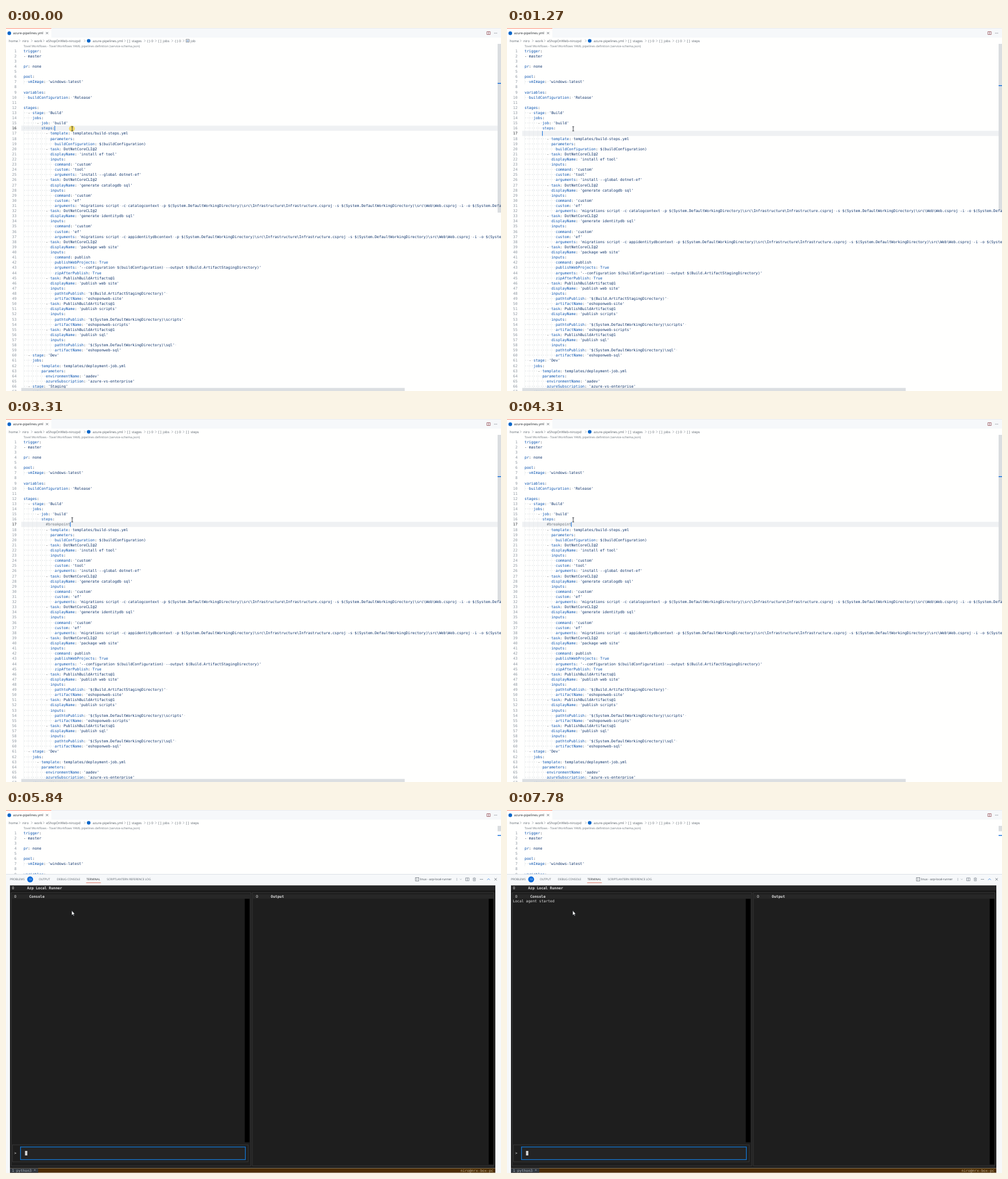
An HTML page that plays this animation: 874x641 px, repeating every 8000 ms.

```html
<!DOCTYPE html>
<html lang="en">
<head>
<meta charset="utf-8">
<title>Pipeline editor</title>
<style>
  html, body { margin: 0; width: 100%; height: 100%; overflow: hidden; background: #fffffe; }
  svg { display: block; width: 874px; height: 641px; }
  text { white-space: pre; text-rendering: geometricPrecision; }
  .mono { font-family: "DejaVu Sans Mono", monospace; }
  .ui { font-family: "Open Sans", sans-serif; }
</style>
</head>
<body>
<svg id="stage" viewBox="0 0 874 641"></svg>
<script>
(() => {
const LOOP = 8000, ROW = 9.115, COL = 3.93, LEFT = 31, CODE = 6.53, TERM = 6.43;
const KEY = '#0550ae', STR = '#0a3069', INK = '#24292f', MUTED = '#6e7781';
const BLUE = '#0969da', PANEL = '#f6f8fa', BROWN = '#4d2d00';

const source = String.raw`trigger:
- master

pr: none

pool:
  vmImage: 'windows-latest'

variables:
  buildConfiguration: 'Release'

stages:
  - stage: 'Build'
    jobs:
      - job: 'build'
        steps:
          - template: templates/build-steps.yml
            parameters:
              buildConfiguration: $(buildConfiguration)
          - task: DotNetCoreCLI@2
            displayName: 'install ef tool'
            inputs:
              command: 'custom'
              custom: 'tool'
              arguments: 'install --global dotnet-ef'
          - task: DotNetCoreCLI@2
            displayName: 'generate catalogdb sql'
            inputs:
              command: 'custom'
              custom: 'ef'
              arguments: 'migrations script -c catalogcontext -p $(System.DefaultWorkingDirectory)\src\Infrastructure\Infrastructure.csproj -s $(System.DefaultWorkingDirectory)\src\Web\Web.csproj -i -o $(System.DefaultWorkingDirectory)'
          - task: DotNetCoreCLI@2
            displayName: 'generate identitydb sql'
            inputs:
              command: 'custom'
              custom: 'ef'
              arguments: 'migrations script -c appidentitydbcontext -p $(System.DefaultWorkingDirectory)\src\Infrastructure\Infrastructure.csproj -s $(System.DefaultWorkingDirectory)\src\Web\Web.csproj -i -o $(System.DefaultWorkingDirectory)'
          - task: DotNetCoreCLI@2
            displayName: 'package web site'
            inputs:
              command: publish
              publishWebProjects: True
              arguments: '--configuration $(buildConfiguration) --output $(Build.ArtifactStagingDirectory)'
              zipAfterPublish: True
          - task: PublishBuildArtifacts@1
            displayName: 'publish web site'
            inputs:
              pathtoPublish: '$(Build.ArtifactStagingDirectory)' 
              artifactName: 'eshoponweb-site'
          - task: PublishBuildArtifacts@1
            displayName: 'publish scripts'
            inputs:
              pathtoPublish: '$(System.DefaultWorkingDirectory)\scripts' 
              artifactName: 'eshoponweb-scripts'
          - task: PublishBuildArtifacts@1
            displayName: 'publish sql'
            inputs:
              pathtoPublish: '$(System.DefaultWorkingDirectory)\sql' 
              artifactName: 'eshoponweb-sql'
  - stage: 'Dev'
    jobs:
      - template: templates/deployment-job.yml
        parameters:
          environmentName: 'aadev'
          azureSubscription: 'azure-vs-enterprise'
  - stage: 'Staging'
    jobs:`.split('\n');

const stage = document.getElementById('stage');

function el(parent, tag, attrs = {}, content) {
  const node = document.createElementNS('http://www.w3.org/2000/svg', tag);
  for (const name in attrs) node.setAttribute(name, attrs[name]);
  if (content !== undefined) node.textContent = content;
  return parent.appendChild(node);
}
const group = (parent) => el(parent, 'g');
const rect = (p, x, y, width, height, fill, more) => el(p, 'rect', { x, y, width, height, fill, ...more });
const path = (p, d, stroke, more) => el(p, 'path', { d, fill: 'none', stroke, 'stroke-width': 0.7, ...more });
const dot = (p, cx, cy, r, fill, more) => el(p, 'circle', { cx, cy, r, fill, ...more });
// y is the middle of the text line
const text = (p, cls, x, y, size, fill, str, more) =>
  el(p, 'text', { class: cls, x, y: y + size * 0.35, 'font-size': size, fill, ...more }, str);
const ui = (p, x, y, str, size = 5.9, fill = '#57606a', more) => text(p, 'ui', x, y, size, fill, str, more);
const term = (p, x, y, str, fill, more) => text(p, 'mono', x, y, TERM, fill, str, more);
const rowY = (row) => 40.3 + (row - 1) * ROW;
const colX = (col) => LEFT + col * COL;
const show = (node, on) => node.setAttribute('visibility', on ? 'inherit' : 'hidden');
const ellipsis = (p, x, y) => [-2, 0, 2].forEach(dx => dot(p, x + dx, y, 0.6, '#57606a'));
const cross = (p, x, y) => path(p, `M${x - 2} ${y - 2}l4 4m0 -4l-4 4`, '#424a53');
const split = (p, x, y, color) => path(p, `M${x - 3} ${y - 2.5}h6v5h-6zm3 0v5`, color);

function guides(parent, row, indent) {
  for (let c = 0; c < indent; c += 2)
    rect(parent, colX(c), rowY(row) - ROW / 2, 0.4, ROW, '#dfe3e6');
}

function codeLine(parent, str, row) {
  const [, indent, dash = '', key = '', colon = '', value] =
    str.match(/^( *)(- )?(?:(\w+)(:))?(.*)$/);
  guides(parent, row, indent.length);
  text(parent, 'mono', LEFT, rowY(row), CODE, '#b4bcc4', str.replace(/[^ ]/g, '\u00a0').replace(/ /g, '·'));
  const line = text(parent, 'mono', colX(indent.length), rowY(row), CODE, INK);
  el(line, 'tspan', {}, dash);
  el(line, 'tspan', { fill: KEY }, key);
  el(line, 'tspan', {}, colon);
  el(line, 'tspan', { fill: / True/.test(value) ? KEY : STR }, value);
}

// Editor
rect(stage, 0, 0, 874, 641, '#fffffe');
const editor = group(stage);
const band = rect(editor, 27, 0, 841, ROW, '#eff1f3');
const upper = group(editor), lower = group(editor);
source.forEach((str, i) => codeLine(i < 16 ? upper : lower, str, i + 1));

const typedRow = group(editor);
guides(typedRow, 17, 8);
const typed = text(typedRow, 'mono', colX(10), rowY(17), CODE, MUTED, '#breakpoint');

const numbers = source.map((_, i) =>
  text(editor, 'mono', 18.6, rowY(i + 1), CODE, '#8c959f', i + 1, { 'text-anchor': 'end' }));
const caret = rect(editor, 0, 0, 1, 8.6, BLUE);
const vSlider = rect(editor, 868, 28, 6, 298, '#8c959f', { opacity: 0.32 });
const rulerMark = rect(editor, 868, 97, 6, 1.4, BLUE);
rect(editor, 27, 635.6, 677, 5.4, '#d9dcdf', { opacity: 0.9 });

// Tab bar and breadcrumb
const header = group(stage);
rect(header, 0, 0, 874, 17, PANEL);
rect(header, 0, 0, 80, 17, '#fffffe');
rect(header, 0, 0, 874, 0.6, '#e1e4e8');
rect(header, 0, 0, 80, 1, '#fd8c73');
dot(header, 5.8, 9.2, 3.2, '#0a66c8');
ui(header, 12.5, 9.2, 'azure-pipelines.yml', 5.9, INK);
cross(header, 72.5, 9);
split(header, 852, 9, '#8a3a42');
ellipsis(header, 864.5, 9);
[[5, 'home'], [29, 'niro'], [50, 'work'], [71, 'eShopOnWeb-nirozpd'], [153, 'azure-pipelines.yml'],
 [214, '[ ]'], [222, 'stages'], [249, '{ } 0'], [269, '[ ]'], [277, 'jobs'], [298, '{ } 0']]
  .forEach(([x, str]) => ui(header, x, 22.6, str));
[24, 45.5, 66.5, 139, 210, 245, 264.5, 293.5, 313.5]
  .forEach(x => path(header, `M${x - 1} 20.6l2 2l-2 2`, MUTED, { 'stroke-width': 0.6 }));
dot(header, 146, 22.6, 3.2, '#0a66c8');
const crumbJob = group(header), crumbSteps = group(header);
rect(crumbJob, 318, 20, 5.4, 5, 'none', { stroke: '#424a53', 'stroke-width': 0.6 });
path(crumbJob, 'M319 22h3.4M319 23.4h3.4', '#0550ae', { 'stroke-width': 0.5 });
ui(crumbJob, 326, 22.6, 'job');
ui(crumbSteps, 317.5, 22.6, '[ ]');
ui(crumbSteps, 326, 22.6, 'steps');
ui(header, LEFT, 32, 'Tovel Workflows - Tovel Workflows YAML pipelines definition (service-schema.json)', 5.4, MUTED);

// Panel header
const panel = group(stage);
rect(panel, 0, 113.5, 874, 528, PANEL);
rect(panel, 0, 113.2, 874, 0.7, '#d0d7de');
[[7, 'PROBLEMS'], [58, 'OUTPUT'], [90, 'DEBUG CONSOLE'], [142, 'TERMINAL'], [178, 'SCRIPTLANTERN REFERENCE LOG']]
  .forEach(([x, str]) => ui(panel, x, 122.5, str, 5, str === 'TERMINAL' ? INK : '#57606a'));
dot(panel, 42.6, 122.5, 5.2, BLUE);
ui(panel, 42.6, 122.5, '13', 4.8, '#fff', { 'text-anchor': 'middle' });
rect(panel, 141.5, 128, 26, 0.9, '#e0705c');
rect(panel, 723, 119.6, 5.8, 5.6, 'none', { stroke: '#424a53', 'stroke-width': 0.6 });
path(panel, 'M724.6 121l1.6 1.4l-1.6 1.4', '#424a53', { 'stroke-width': 0.5 });
ui(panel, 731, 122.4, 'linux - azp-local-runner', 5.2, '#424a53');
path(panel, 'M796 120v5M801.4 121.6l1.5 1.5l1.5 -1.5', '#8c959f', { 'stroke-width': 0.6 });
split(panel, 814.5, 122.4, MUTED);
path(panel, 'M824.4 120.4h5M825 120.4v4.8h3.8v-4.8M826.2 119.4h1.4M826.2 121.8v2.2M827.7 121.8v2.2', MUTED, { 'stroke-width': 0.6 });
ellipsis(panel, 839.5, 122.4);
path(panel, 'M849.6 123.6l2.4 -2.4l2.4 2.4', BLUE);
cross(panel, 864.5, 122.4);

// Shell prompt
const shell = group(panel);
rect(shell, 7, 133.4, 14.5, 7.8, '#6e7781');
dot(shell, 12.6, 137.3, 2, '#24292f');
el(shell, 'path', { d: 'M128 133.4H244.5l3.8 3.9l-3.8 3.9H128z', fill: BROWN });
el(shell, 'path', { d: 'M21 133.4H128l3.8 3.9l-3.8 3.9H21z', fill: BLUE });
el(shell, 'path', { d: 'M25.5 135.4h2l.6 .8h2v3h-4.6z', fill: '#fff' });
term(shell, 33.6, 137.3, '~/work/azp-local-runner', '#fff', { 'font-weight': 700 });
rect(shell, 133.8, 135.8, 4, 2.6, '#c4b49c');
path(shell, 'M142 134.6v5.2M144.8 135v1.2q0 1.4 -2.8 1.8', '#c4b49c');
term(shell, 148.3, 137.3, 'niro/textual-ui *2 !1 ?1', '#c4b49c');
el(shell, 'path', { d: 'M852.5 133.4H775.5l-3.8 3.9l3.8 3.9H852.5z', fill: BLUE });
term(shell, 779, 137.3, 'azp-local-runner', '#fff', { 'font-weight': 700 });
dot(shell, 847, 137.3, 2.1, '#fff');
rect(shell, 853.4, 137.4, 4.6, 7, 'none', { stroke: '#c4cad0', 'stroke-width': 0.7 });
path(shell, 'M7.6 142.2l2.2 2.8l-2.2 2.8', INK, { 'stroke-width': 0.9 });
rect(shell, 14.6, 141.2, 3.9, 7.8, '#1b1f24');

// Text user interface
const tui = group(panel);
rect(tui, 7, 133.4, 857, 499, '#1e1e1e');
rect(tui, 7, 133.4, 857, 8.6, '#252526');
rect(tui, 7, 142, 857, 3.4, '#191919');
const frame = (x, y, w, h) => rect(tui, x, y, w, h, 'none', { stroke: '#3c3c3c', 'stroke-width': 0.8 });
const heading = (ring, x, y, str) => {
  term(tui, ring, y, 'O', '#e0e0e0');
  term(tui, x, y, str, '#e0e0e0', { 'font-weight': 700 });
};
heading(10.6, 37.2, 137.6, 'Azp Local Runner');
[[9.4, 422.8, 'Console', 14.6, 41, 421.6, 430], [435, 426.6, 'Output', 441.2, 467.6, 852.4, 469]].forEach(
  ([x, w, title, ring, titleX, barX, barH]) => {
    frame(x, 145.8, w, 482.8);
    rect(tui, x + 1, 149, w - 2, 7.6, '#272727');
    heading(ring, titleX, 152.9, title);
    rect(tui, barX, 156.8, 8.2, barH, '#000');
  });
frame(11.4, 591.2, 416, 30);
rect(tui, 25.6, 595, 397, 22.4, '#242424', { stroke: '#1478d4', 'stroke-width': 1.3 });
term(tui, 14.4, 606, '>', '#e0e0e0');
const block = rect(tui, 33.6, 602, 4, 8, '#d8d8d8');
const agent = term(tui, 10.4, 160.6, 'Local agent started', '#e0e0e0');

// Status line
const status = group(panel);
rect(status, 7, 632.6, 857, 7.9, BROWN);
const statusTab = rect(status, 7, 632.6, 33, 7.9, '#32383f');
const statusText = term(status, 10.4, 636.6, '', '#a8b0b8');
term(status, 802.4, 636.6, 'niro@nrx-box-pc', '#c4b49c');

// Pointer
const halo = dot(stage, 116.4, 177.6, 5.2, '#f2d64b');
const beam = path(stage, 'M115.4 174.2h3M116.9 174.2v7.6M115.4 181.8h3', INK, { 'stroke-width': 0.9 });
const arrow = path(stage, 'M116 177.6v8.4l1.9 -1.7l1.3 2.7l1.3 -.6l-1.3 -2.6h2.5z', '#1b1f24', { fill: '#fff' });

const between = (t, a, b) => t >= a && t < b;

function update(t) {
  const inserted = t >= 1270, panelOpen = t >= 4440, app = t >= 5840;
  const row = inserted ? 17 : 16;

  lower.setAttribute('transform', `translate(0 ${inserted ? ROW : 0})`);
  show(typedRow, inserted);
  show(typed, t >= 2320);
  band.setAttribute('y', rowY(row) - ROW / 2);
  numbers.forEach((n, i) => n.setAttribute('fill', i + 1 === row ? INK : '#8c959f'));

  const col = t < 1270 ? 14 : t < 1860 ? 8 : t < 2060 ? 9 : t < 2320 ? 10 : 21;
  caret.setAttribute('x', colX(col) - 0.4);
  caret.setAttribute('y', rowY(row) - 4.3);
  show(caret, !between(t, 470, 1000) && !between(t, 2850, 3310) && !between(t, 3840, 4310));

  vSlider.setAttribute('height', panelOpen ? 9.5 : inserted ? 293 : 298);
  rulerMark.setAttribute('y', panelOpen ? 44.2 : inserted ? 101 : 97);
  show(crumbJob, t < 270);
  show(crumbSteps, t >= 270);

  show(panel, panelOpen);
  show(shell, !app);
  show(tui, app);
  statusTab.setAttribute('width', app ? 50 : 33);
  statusText.textContent = app ? '1 python3 *' : '1 zsh *';
  show(agent, t >= 6240);
  show(block, !between(t, 6310, 6780) && !between(t, 7310, 7780));

  halo.setAttribute('opacity', t < 70 ? 0.85 : t < 170 ? 0.45 : t < 270 ? 0.2 : 0);
  show(beam, !panelOpen);
  show(arrow, panelOpen);
}

function tick() {
  update(performance.now() % LOOP);
  requestAnimationFrame(tick);
}
tick();
})();
</script>
</body>
</html>
```
